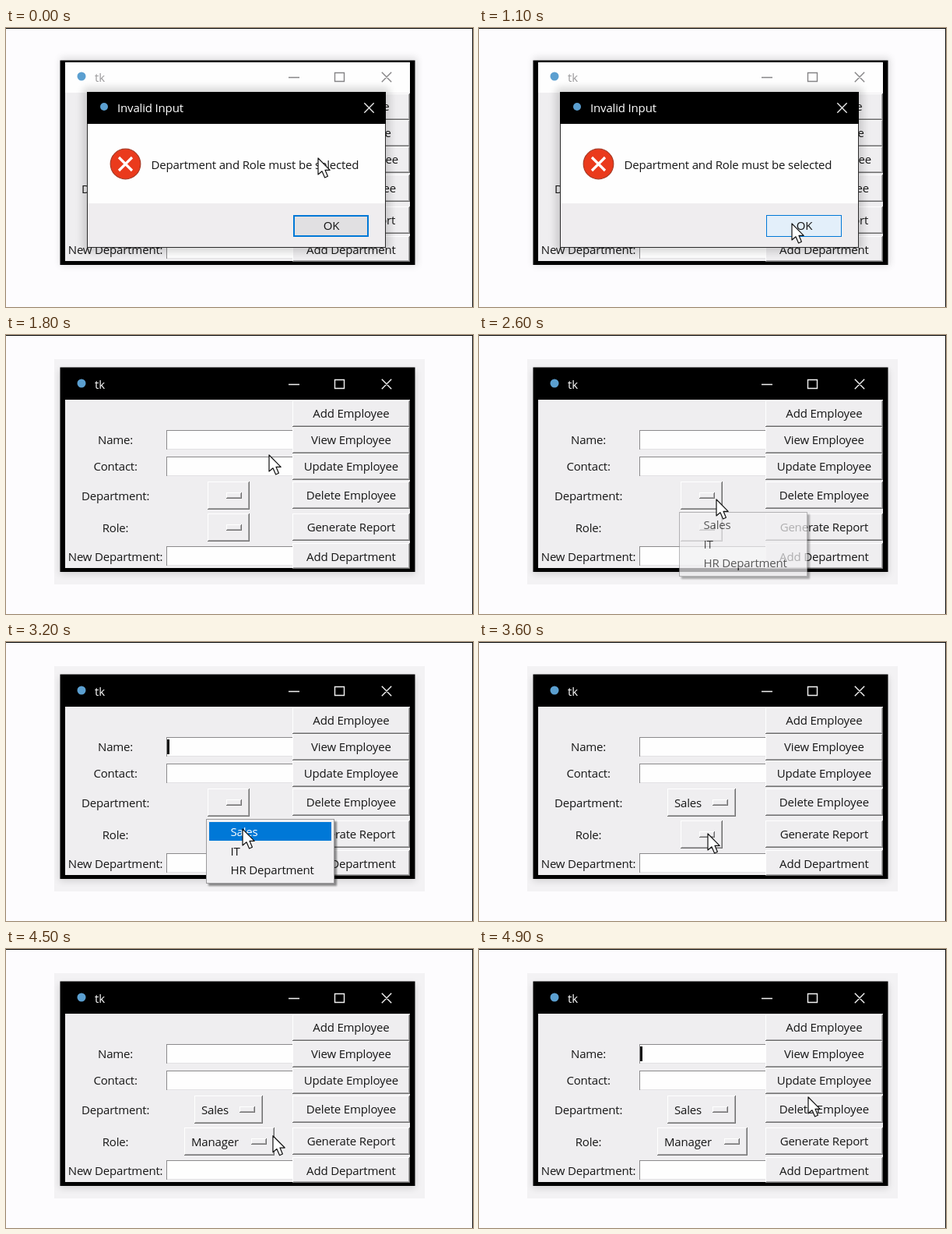
Write an HTML page that moves like this. It is 600 px wide and 358 px high and loops after 5 s.

```html
<!DOCTYPE html>
<html lang="en">
<head>
<meta charset="utf-8">
<title>Employee form</title>
<style>
html, body { margin: 0; width: 100%; height: 100%; overflow: hidden; background: #fdfcfe; }
svg { display: block; }
text {
  font: 15px "Open Sans", "Noto Sans", sans-serif; letter-spacing: -.17px;
  fill: #161616; white-space: pre;
}
rect { shape-rendering: crispEdges; }
.mid { text-anchor: middle; }
.soft { shape-rendering: auto; }
.glyph { fill: none; stroke-width: 1.4; }
</style>
</head>
<body>
<svg id="stage" width="600" height="358" viewBox="0 0 600 358"></svg>
<script>
const FACE = '#efeef0', BLUE = '#0078d7', ICON = '#5b9fd0';

const box = (x, y, w, h, fill, more = '') =>
  `<rect x="${x}" y="${y}" width="${w}" height="${h}" fill="${fill}" ${more}/>`;
const label = (x, y, s, cls = '', more = '') =>
  `<text x="${x}" y="${y}" class="${cls}" ${more}>${s}</text>`;
const group = (id, body, more = '') => `<g id="${id}" ${more}>${body}</g>`;

const raised = (x, y, w, h) =>
  box(x, y, w, h, '#6f6f6f') + box(x, y, w - 1, h - 1, '#fff') +
  box(x + 1, y + 1, w - 2, h - 2, '#a8a7a9') + box(x + 1, y + 1, w - 3, h - 3, FACE);

const entry = y =>
  box(206, y, 162, 25, '#8b8a8c') + box(207, y + 1, 161, 24, '#e3e2e4') +
  box(207, y + 1, 161, 23, '#fefefe');

const button = (y, h, base, s) => raised(368, y, 151, h) + label(443.4, base, s, 'mid');

const option = (x, y, w, s = '') =>
  raised(x, y, w, 36) + label(x + 9, y + 23.5, s) + raised(x + w - 30, y + 14, 20, 8);

const cross = (x, y, r) => `M${x - r} ${y - r}l${2 * r} ${2 * r}m0 ${-2 * r}l${-2 * r} ${2 * r}`;

function menu(id, x, y, w, h, items) {
  const rows = items.map((s, i) => label(x + 31.5, y + 22 + i * 24.6, s, '', i ? '' : `id="${id}First"`));
  return group(id,
    box(x + 3, y + 3, w, h, '#000', 'opacity=".42" class="soft" filter="url(#near)"') +
    box(x, y, w, h, '#9b9a9c') + box(x + 1, y + 1, w - 2, h - 2, '#f1f0f2') +
    box(x + 4, y + 4, w - 8, 24, BLUE, `id="${id}Bar"`) + rows.join(''));
}

const defs = `<defs>
  <filter id="near" x="-20%" y="-20%" width="140%" height="140%"><feGaussianBlur stdDeviation="1.3"/></filter>
  <filter id="far" x="-20%" y="-20%" width="140%" height="140%"><feGaussianBlur stdDeviation="5"/></filter>
</defs>`;

const backdrop = box(0, 0, 600, 358, '#fdfcfe') +
  group('activeShade', box(62, 31, 476, 289, '#f3f2f4') +
    box(69, 45, 457, 262, '#000', 'opacity=".13" class="soft" filter="url(#far)"')) +
  group('idleShade', box(70, 38, 458, 267, '#000', 'opacity=".12" class="soft" filter="url(#far)"'));

const form = box(69.5, 41.5, 456, 262.5, '#000', 'class="soft"') + box(76, 83, 443, 216, FACE) +
  box(76, 44, 443, 39, '#fff', 'id="bar"') +
  `<circle cx="97" cy="62" r="5.5" fill="${ICON}"/>` +
  label(114, 69, 'tk', '', 'id="title"') +
  `<path id="controls" class="glyph" d="M363 63.5h14M422.5 57.5h12v11h-12z${cross(489, 63, 6.2)}"/>` +
  [[139.5, 'Name:'], [174, 'Contact:'], [212, 'Department:'], [252.5, 'Role:'], [289.5, 'New Department:']]
    .map(([y, s]) => label(140.6, y, s, 'mid')).join('') +
  [122, 156, 271].map(entry).join('') +
  [[84, 34, 106, 'Add Employee'], [118, 34, 140, 'View Employee'], [152, 34, 174, 'Update Employee'],
   [188, 35, 211, 'Delete Employee'], [229, 35, 251.5, 'Generate Report'], [267, 33, 290, 'Add Department']]
    .map(b => button(...b)).join('') +
  group('deptEmpty', option(259, 188, 54)) + group('deptSet', option(242, 188, 88, 'Sales')) +
  group('roleEmpty', option(259, 229, 54)) + group('roleSet', option(229, 229, 116, 'Manager')) +
  box(207, 125, 3, 19, '#111', 'id="caret"');

const dialog = group('dialog',
  box(98, 76, 396, 212, '#000', 'rx="8" opacity=".14" class="soft" filter="url(#far)"') +
  box(104, 82, 384, 200, '#2a2a2a') + box(104, 82, 384, 41, '#000') +
  box(105, 123, 382, 102, '#fefefe') + box(105, 225, 382, 56, '#efedef') +
  `<circle cx="126" cy="101" r="5" fill="${ICON}"/>` +
  label(143, 108, 'Invalid Input', '', 'style="fill:#fff"') +
  `<path class="glyph" stroke="#e8e8e8" d="${cross(466.5, 102.5, 6.2)}"/>` +
  '<circle cx="153.5" cy="174.5" r="19.3" fill="#ea3a1c" stroke="#a83a26" stroke-width="1.2"/>' +
  `<path d="${cross(153.5, 174.5, 8.5)}" stroke="#fff" stroke-width="3.2"/>` +
  label(186.5, 181, 'Department and Role must be selected') +
  box(369, 240, 97, 28, BLUE) + box(371, 242, 93, 24, '#e1e0e2', 'id="okFace"') +
  label(418, 259, 'OK', 'mid'));

const pointer = '<path id="pointer" d="M0 0V21L5 16.8L8.6 25L12.4 23.3L9 15.3H15.2Z" ' +
  'fill="#fff" stroke="#111" stroke-width="1.2" stroke-linejoin="round"/>';

document.getElementById('stage').innerHTML = defs + backdrop + form + dialog +
  menu('deptMenu', 257, 227, 165, 83, ['Sales', 'IT', 'HR Department']) +
  menu('roleMenu', 257, 268, 127, 82, ['Manager', 'Developer', 'HR']) +
  pointer + box(0, 0, 600, 1, '#000') + box(599, 0, 1, 358, '#111');

const el = id => document.getElementById(id);
const show = (id, on) => { el(id).style.opacity = +on; };
const set = (id, attrs) => { for (const k in attrs) el(id).setAttribute(k, attrs[k]); };

// time, x, y of the pointer tip
const track = [
  [0, 401, 167], [600, 402, 251], [1300, 402, 251], [1800, 338, 154], [2400, 305, 211],
  [2800, 305, 211], [3100, 304, 240], [3300, 304, 240], [3600, 294, 246], [3700, 294, 246],
  [3900, 291, 272], [4200, 291, 272], [4900, 423, 190]
];

function tip(t) {
  const i = track.findIndex(p => p[0] >= t);
  if (i < 1) return track[0].slice(1);
  const [t0, x0, y0] = track[i - 1], [t1, x1, y1] = track[i];
  const u = (t - t0) / (t1 - t0), e = u * u * (3 - 2 * u);
  return [x0 + (x1 - x0) * e, y0 + (y1 - y0) * e];
}

// part-transparent for one step on opening and closing
const fade = (t, from, to) => t < from || t > to ? 0 : t === from || t === to ? 0.7 : 1;

function highlight(id, on) {
  show(id + 'Bar', on);
  el(id + 'First').style.fill = on ? '#fff' : '';
}

function draw(now) {
  const t = Math.floor(now % 5000 / 100) * 100;
  const [x, y] = tip(t);
  const idle = t < 1300;
  set('pointer', { transform: `translate(${x} ${y})` });

  show('dialog', t < 1300 ? 1 : t === 1300 ? 0.5 : 0);
  show('activeShade', !idle);
  show('idleShade', idle);
  set('bar', { fill: idle ? '#fefefe' : '#000' });
  el('title').style.fill = idle ? '#9a999b' : '#fff';
  set('controls', { stroke: idle ? '#858486' : '#f4f4f4' });

  const hover = y > 240 && idle;
  set('okFace', hover
    ? { x: 370, y: 241, width: 95, height: 26, fill: '#e3effa' }
    : { x: 371, y: 242, width: 93, height: 24, fill: '#e1e0e2' });

  show('caret', t >= 1900 && (t - 1900) % 900 < 600);
  show('deptEmpty', t < 3400);
  show('deptSet', t >= 3400);
  show('roleEmpty', t < 4300);
  show('roleSet', t >= 4300);
  show('deptMenu', fade(t, 2600, 3400));
  show('roleMenu', fade(t, 3800, 4300));
  highlight('deptMenu', y > 231);
  highlight('roleMenu', y > 270);
}

const start = performance.now();
function tick() {
  draw(performance.now() - start);
  requestAnimationFrame(tick);
}
draw(0);
requestAnimationFrame(tick);
</script>
</body>
</html>
```
